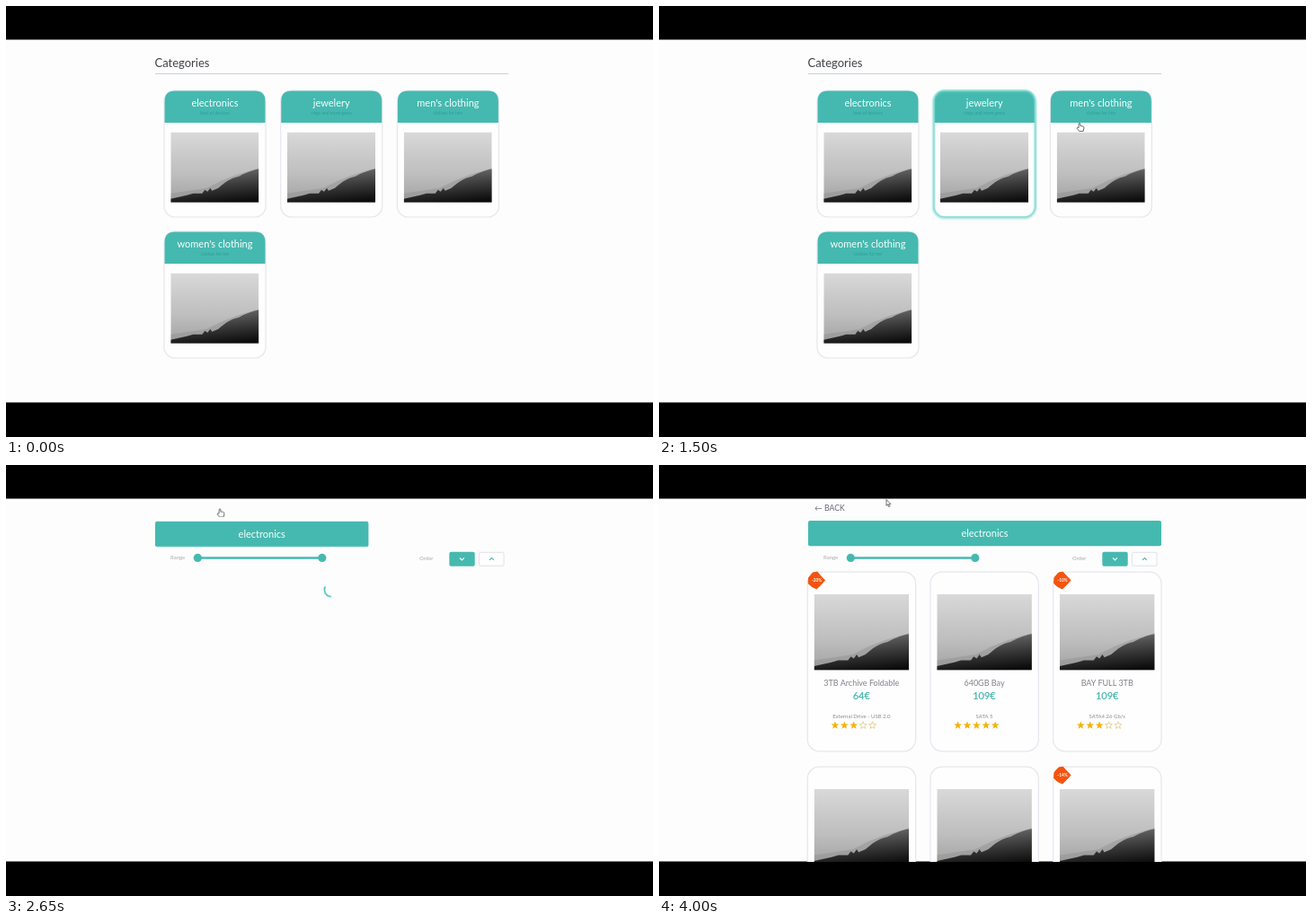
An HTML page that plays this animation: 720 px wide and 480 px high, repeating every 4.05 s.

```html
<!DOCTYPE html>
<html lang="en">
<head>
<meta charset="utf-8">
<title>Shop categories</title>
<style>
  html, body { margin: 0; width: 100%; height: 100%; overflow: hidden; background: #000; }
  #stage { display: block; width: 720px; height: 480px; font-family: Lato, "Open Sans", sans-serif; }
  .mid { text-anchor: middle; }
  .teal { fill: #45b9b0; }
  .edge { fill: #fefefe; stroke: #e6e6ee; stroke-width: 1.2; }
  .title { font-size: 11px; fill: #fafefd; }
  .sub { font-size: 5px; fill: #2f9d95; }
  .label { font-size: 6px; fill: #a9abb0; }
  .name { font-size: 9px; fill: #7f828a; }
  .price { font-size: 11px; fill: #40b3aa; stroke: #40b3aa; stroke-width: .2; }
  .note { font-size: 6px; fill: #888b92; }
  .off { font-size: 4.8px; font-weight: 700; fill: #fff; }
  .glow { fill: none; stroke: #86e2d4; stroke-width: 1.6; filter: drop-shadow(0 1px 1px #6fcfc6); opacity: 0; }

  /* One loop is 4050 ms; 1% = 40.5 ms */
  .home, .shop, .list, .spinner, .back, .bar, .bar-text, .turn, .dash, .glow, .cursor, .shown, .arrow, .hand {
    animation: 4050ms linear infinite;
  }
  .home { animation-name: home; animation-timing-function: step-end; }
  .shop { animation-name: shop; animation-timing-function: step-end; }
  .list { animation-name: list; animation-timing-function: step-end; }
  .spinner { animation-name: wait; animation-timing-function: step-end; }
  .shown { animation-name: shown; animation-timing-function: step-end; }
  .arrow { animation-name: arrow; animation-timing-function: step-end; }
  .hand { animation-name: hand; animation-timing-function: step-end; }
  .bar { animation-name: bar; animation-timing-function: cubic-bezier(0, 0, .2, 1); }
  .bar-text { animation-name: bar-text; animation-timing-function: cubic-bezier(0, 0, .2, 1); }
  .back { animation-name: back; }
  .turn { animation-name: turn; }
  .dash { animation-name: dash; animation-timing-function: ease-in-out; }
  .cursor { animation-name: cursor; animation-timing-function: ease-in-out; }
  .g0 { animation-name: glow0; }
  .g1 { animation-name: glow1; }
  .g2 { animation-name: glow2; }
  .g3 { animation-name: glow3; }

  @keyframes home { 0% { opacity: 1; } 58.02%, 100% { opacity: 0; } }
  @keyframes shop { 0% { opacity: 0; } 58.02%, 100% { opacity: 1; } }
  @keyframes list { 0% { opacity: 0; } 87.65%, 100% { opacity: 1; } }
  @keyframes wait { 0% { opacity: 1; } 87.65%, 100% { opacity: 0; } }
  @keyframes shown { 0% { opacity: 0; } 4.94%, 100% { opacity: 1; } }
  @keyframes arrow { 0% { opacity: 1; } 20.4% { opacity: 0; } 68%, 100% { opacity: 1; } }
  @keyframes hand { 0% { opacity: 0; } 20.4% { opacity: 1; } 68%, 100% { opacity: 0; } }
  @keyframes bar {
    0%, 58.02% { width: 0; transform: translateY(2px); }
    85.68%, 100% { width: 393px; transform: none; }
  }
  @keyframes bar-text {
    0%, 58.02% { transform: translate(166px, 2px); }
    85.68%, 100% { transform: translate(362.5px, 0); }
  }
  @keyframes back {
    0%, 87.65% { opacity: 0; }
    98.7%, 100% { opacity: 1; }
  }
  @keyframes turn {
    0%, 58.02% { transform: none; }
    92.59%, 100% { transform: rotate(360deg); }
  }
  @keyframes dash {
    0%, 58.02% { stroke-dasharray: 1 200; stroke-dashoffset: 0; }
    75.31% { stroke-dasharray: 100 200; stroke-dashoffset: -15; }
    92.59%, 100% { stroke-dasharray: 100 200; stroke-dashoffset: -125; }
  }
  @keyframes cursor {
    0%, 4.94% { transform: translate(650px, 438px); }
    13%, 14.5% { transform: translate(597px, 255.5px); }
    24.7% { transform: translate(250px, 320px); }
    30.86% { transform: translate(238px, 170px); animation-timing-function: linear; }
    37.04% { transform: translate(468px, 130px); }
    41.5% { transform: translate(500px, 150px); }
    50.62% { transform: translate(249.5px, 134.5px); }
    57% { transform: translate(238px, 128px); }
    65.43% { transform: translate(238px, 48.5px); }
    77%, 100% { transform: translate(252.5px, 38px); }
  }
  @keyframes glow0 {
    0%, 28.5% { opacity: 0; } 31%, 32.5% { opacity: 1; } 35.5%, 47% { opacity: 0; } 50%, 100% { opacity: 1; }
  }
  @keyframes glow1 {
    0%, 32.5% { opacity: 0; } 35.5%, 37.2% { opacity: 1; } 40.7%, 44% { opacity: 0; }
    46% { opacity: 1; } 49.5%, 100% { opacity: 0; }
  }
  @keyframes glow2 { 0%, 37.2% { opacity: 0; } 40.7%, 44% { opacity: 1; } 47.5%, 100% { opacity: 0; } }
  @keyframes glow3 { 0%, 20.5% { opacity: 0; } 23.5%, 27% { opacity: 1; } 30.5%, 100% { opacity: 0; } }
</style>
</head>
<body>
<svg id="stage" viewBox="0 0 720 480">
  <defs>
    <linearGradient id="sky" x2="0" y2="1">
      <stop offset="0" stop-color="#d9d9d9"/>
      <stop offset=".3" stop-color="#cbcbcb"/>
      <stop offset=".6" stop-color="#bebebe"/>
      <stop offset="1" stop-color="#a2a2a2"/>
    </linearGradient>
    <linearGradient id="hill" x1=".4" x2=".65" y2="1">
      <stop offset="0" stop-color="#707070"/>
      <stop offset=".5" stop-color="#3c3c3c"/>
      <stop offset="1" stop-color="#0c0c0c"/>
    </linearGradient>
    <symbol id="photo" viewBox="0 0 98 78" preserveAspectRatio="none">
      <path d="M0 0H98V78H0Z" fill="url(#sky)"/>
      <path d="M0 68L20 65 40 62 56 54 74 47 98 40V78H0Z" fill="#8f8f8f" opacity=".45"/>
      <path d="M98 41C88 43 82 46 76 49C66 51 60 56 53 62L46 65 44 62 41 66 38 64 35 68 25 68 18 70 0 74V78H98Z" fill="url(#hill)"/>
    </symbol>
    <clipPath id="page"><path d="M0 37.5H720V441.5H0Z"/></clipPath>
  </defs>

  <path d="M0 37.5H720V441.5H0Z" fill="#fdfdfd"/>

  <g clip-path="url(#page)">
    <g class="home" id="home">
      <text x="165.5" y="68.3" font-size="13" fill="#3f4348">Categories</text>
      <path d="M166 75.5H559" stroke="#c9d0d6"/>
    </g>

    <g class="shop">
      <text class="back" x="173" y="51.3" font-size="8.7" fill="#666a70">← BACK</text>
      <rect class="bar teal" x="166" y="62" width="393" height="28.3" rx="2"/>
      <g class="bar-text"><text class="title mid" y="79.8">electronics</text></g>

      <text class="label" x="183" y="105.3">Range</text>
      <path d="M213 103.4H352" stroke="#45b9b0" stroke-width="2.5"/>
      <circle class="teal" cx="213.3" cy="103.4" r="4.6"/>
      <circle class="teal" cx="351.8" cy="103.4" r="4.6"/>
      <text class="label" x="460" y="106.3">Order</text>
      <rect class="teal" x="493.3" y="96.8" width="28.4" height="16" rx="2"/>
      <rect class="edge" x="526.5" y="97.3" width="27.6" height="15" rx="2"/>
      <g fill="none" stroke-width="1.2">
        <path d="M505 103.5l2.4 2.4 2.4-2.4" stroke="#fafefd"/>
        <path d="M538 105.9l2.4-2.4 2.4 2.4" stroke="#45b9b0"/>
      </g>

      <g class="spinner">
        <g transform="translate(362.4 138.5) scale(.4)">
          <g class="turn"><circle class="dash" r="20.2" fill="none" stroke="#45b9b0" stroke-width="3.8"/></g>
        </g>
      </g>
      <g class="list" id="list"></g>
    </g>
  </g>

  <g class="shown">
    <g class="cursor" stroke="#4a4a4a" stroke-width=".8" stroke-linejoin="round" fill="#fdfdfd">
      <path class="arrow" d="M.4 .4V7.2L2 5.8 3.2 8.6 4.4 8.1 3.2 5.4H5.3Z"/>
      <path class="hand" d="M-.9 5.5V1Q0-.5 .9 1V3.4L4.2 4.2Q5 4.5 4.9 5.6L4.2 9.4H-.5L-2.8 6.4Q-2.9 5-1.9 5.3Z"/>
    </g>
  </g>
</svg>

<script>
  const add = (id, html) => document.getElementById(id).insertAdjacentHTML("beforeend", html);
  const text = (cls, x, y, s) => `<text class="${cls} mid" x="${x}" y="${y}">${s}</text>`;
  const photo = (x, y, w, h) => `<use href="#photo" x="${x}" y="${y}" width="${w}" height="${h}"/>`;
  const place = (x, y, html) => `<g transform="translate(${x} ${y})">${html}</g>`;

  const categories = [
    ["electronics", "best of devices"],
    ["jewelery", "rings and more gems"],
    ["men's clothing", "clothes for him"],
    ["women's clothing", "clothes for her"]
  ];
  categories.forEach(([name, sub], i) => {
    const box = 'width="113" height="141" rx="12"';
    add("home", place(176 + (i % 3) * 129.7, 94 + (i > 2) * 157,
      `<rect class="edge" ${box}/>
       <path class="teal" d="M.5 36V12Q.5 .5 12 .5H101Q112.5 .5 112.5 12V36Z"/>
       ${text("title", 56.5, 18, name)}${text("sub", 56.5, 26.6, sub)}
       ${photo(7.3, 46.4, 98, 78.4)}
       <rect class="glow g${i}" ${box}/>`));
  });

  const starPoints = Array.from({ length: 10 }, (_, i) => {
    const r = i % 2 ? 2 : 4.7, a = (i / 5 - .5) * Math.PI;
    return `${(r * Math.cos(a)).toFixed(2)},${(r * Math.sin(a)).toFixed(2)}`;
  }).join(" ");
  const star = (i, full) =>
    `<polygon points="${starPoints}" transform="translate(${30.6 + i * 10.4} 170.8) scale(${full ? 1 : .9})"
      fill="${full ? "#f5b20c" : "none"}" stroke="#d9bd6a" stroke-width="${full ? 0 : .7}"/>`;
  const badge = off => `<path d="M1 6.5L5.5 1.2 10.5 .2 13 3.2 19 9.5 14.5 14.5 9.8 19 4.5 16.5 .6 13Z"
      fill="#f4540f" stroke="#f4540f" stroke-linejoin="round"/>${text("off", 10, 11.6, off)}`;

  const products = [
    ["3TB Archive Foldable", "64€", "External Drive - USB 2.0", 3, "-20%"],
    ["640GB Bay", "109€", "SATA 5", 5, ""],
    ["BAY FULL 3TB", "109€", "SATA4 26 Gb/s", 3, "-10%"],
    ["", "", "", 0, ""],
    ["", "", "", 0, ""],
    ["", "", "", 0, "-14%"]
  ];
  products.forEach(([name, price, note, stars, off], i) => {
    const rating = stars ? [0, 1, 2, 3, 4].map(n => star(n, n < stars)).join("") : "";
    add("list", place(165.3 + (i % 3) * 136.7, 119.2 + (i > 2) * 217,
      `<rect class="edge" width="120.3" height="199.6" rx="13"/>
       ${photo(7.3, 24.6, 105.6, 84.6)}
       ${text("name", 60, 126.4, name)}${text("price", 60, 141.8, price)}
       ${text("note", 60, 163, note)}${rating}
       ${off && place(.3, -.3, badge(off))}`));
  });
</script>
</body>
</html>
```
